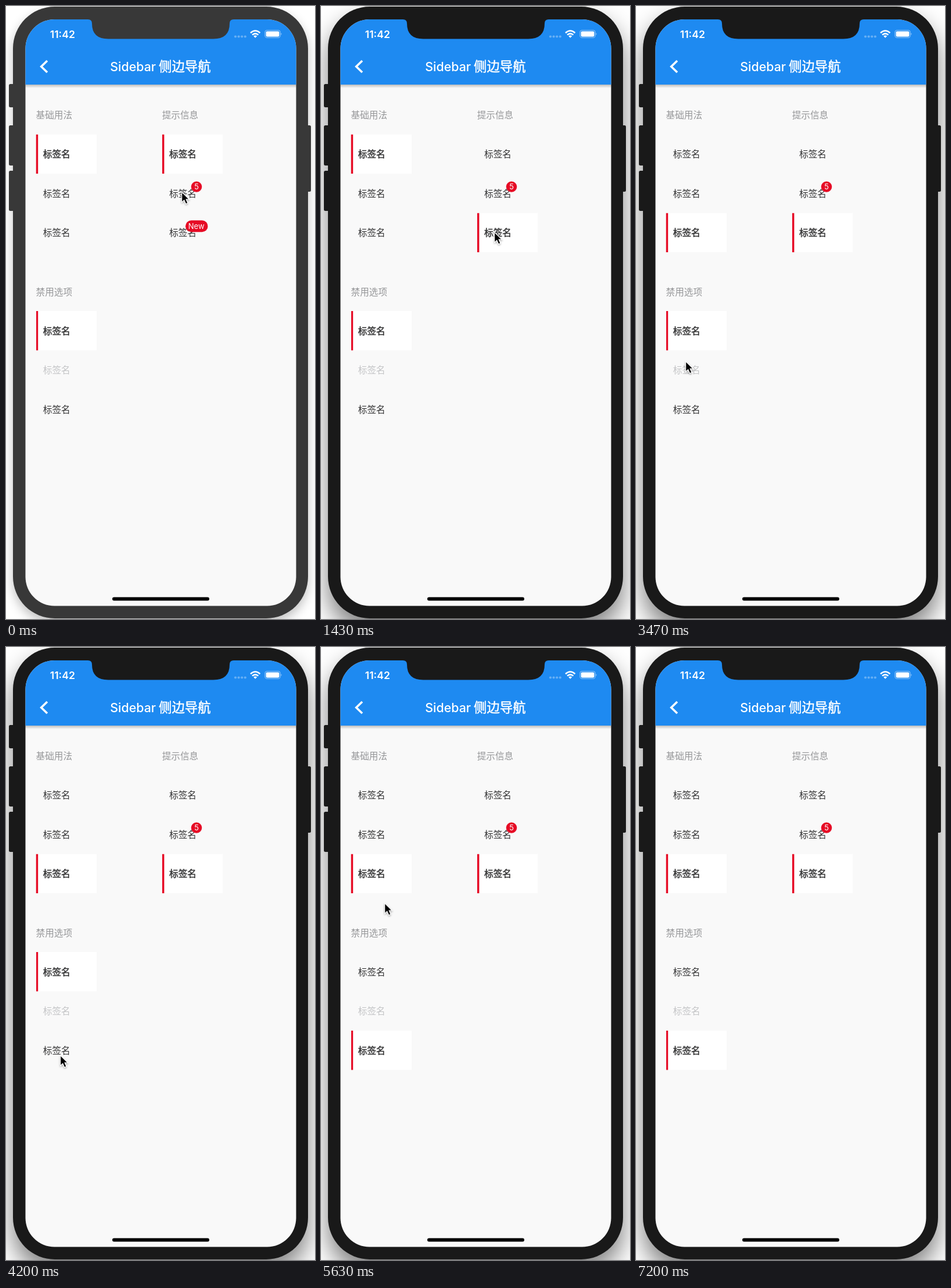
These frames come from a looping animation (532 px wide and 1053 px high, 7230 ms). An HTML page:

```html
<!DOCTYPE html>
<html lang="zh-CN">
<head>
<meta charset="utf-8">
<title>Sidebar</title>
<style>
html, body { margin: 0; width: 100%; height: 100%; overflow: hidden; background: #fff; }
.stage { position: relative; width: 532px; height: 1053px; overflow: hidden; }
.phone {
  position: absolute; left: 12px; top: 1px; width: 508px; height: 1051px;
  border-radius: 72px; background: currentColor;
}
svg { position: absolute; left: 0; top: 0; }
text { font-family: Inter, "Noto Sans CJK SC", "Noto Sans CJK", sans-serif; }
.label { font-size: 15.65px; fill: #959698; }
.item { font-size: 15.65px; fill: #323233; }
.off { fill: #c3c4c6; }
.bold { stroke: #323233; stroke-width: .45px; }
.badge { font-size: 13px; fill: #fff; text-anchor: middle; }
.red { fill: #e60b25; }

.stage, .phone, .pick, .cursor { animation: 7230ms infinite; }
.stage { animation-name: focus; animation-timing-function: step-end; }
.phone { animation-name: shade; animation-timing-function: step-end; }
.pick { animation-timing-function: step-end; }
.basic { animation-name: basic; }
.info { animation-name: info; }
.disabled { animation-name: disabled; }
.cursor { animation-name: move; animation-timing-function: ease-in-out; }

@keyframes focus {
  0% { color: #383838; }
  4.15%, 100% { color: #191919; }
}
@keyframes shade {
  0% { box-shadow: 0 8px 18px rgba(0, 0, 0, .25); }
  4.15%, 100% { box-shadow: 0 22px 40px rgba(0, 0, 0, .5); }
}
@keyframes basic {
  0% { transform: none; }
  31.54% { transform: translateY(67.5px); }
  41.49%, 100% { transform: translateY(135px); }
}
@keyframes info {
  0% { transform: none; }
  5.53% { transform: translateY(67.5px); }
  15.91%, 100% { transform: translateY(135px); }
}
@keyframes disabled {
  0% { transform: none; }
  60.17%, 100% { transform: translateY(135px); }
}
@keyframes move {
  0%, 9.68% { transform: translate(302px, 319px); }
  14.94%, 20.75% { transform: translate(298px, 388px); }
  29.74%, 32.23% { transform: translate(103px, 318px); }
  34.99% { transform: translate(105px, 356px); }
  38.04%, 42.6% { transform: translate(102px, 386px); }
  47.99% { transform: translate(85px, 610px); }
  49.5%, 52.56% { transform: translate(84px, 616px); }
  56.02%, 61.69% { transform: translate(93px, 701px); }
  67.08% { transform: translate(84px, 618px); }
  72.61% { transform: translate(84px, 618px); animation-timing-function: ease-in; }
  77.87% { transform: translate(109px, 440px); animation-timing-function: linear; }
  81.6% { transform: translate(125px, 310px); animation-timing-function: linear; }
  85.06% { transform: translate(150px, 215px); opacity: 1; animation-timing-function: step-start; }
  85.07%, 100% { transform: translate(150px, 215px); opacity: 0; }
}
</style>
</head>
<body>
<div class="stage">
  <div class="phone"></div>
  <svg width="532" height="1053" viewBox="0 0 532 1053">
    <defs>
      <clipPath id="screen"><rect x="33.5" y="23" width="466" height="1007.5" rx="50"/></clipPath>
      <linearGradient id="fall" x2="0" y2="1">
        <stop stop-color="#000" stop-opacity=".24"/>
        <stop offset="1" stop-color="#000" stop-opacity="0"/>
      </linearGradient>
      <filter id="soft" x="-50%" y="-50%" width="200%" height="200%">
        <feDropShadow dx="0" dy="1.5" stdDeviation="1.5" flood-opacity=".35"/>
      </filter>
      <g id="on">
        <rect width="104.5" height="67.5" fill="#fff"/>
        <rect class="red" width="3.7" height="67.5"/>
        <text class="item bold" x="12.3" y="39.8">标签名</text>
      </g>
      <g id="rest">
        <text class="item" x="12.3" y="39.8">标签名</text>
        <text class="item" x="12.3" y="174.8">标签名</text>
      </g>
      <text id="second" x="12.3" y="107.3">标签名</text>
    </defs>

    <g fill="currentColor">
      <rect x="5" y="134" width="9" height="40" rx="2.5"/>
      <rect x="5" y="205" width="9" height="69" rx="2.5"/>
      <rect x="5" y="283" width="9" height="69" rx="2.5"/>
      <rect x="517" y="205" width="8" height="114" rx="2.5"/>
    </g>

    <g clip-path="url(#screen)">
      <rect x="33" y="22" width="468" height="1010" fill="#f9f9f9"/>
      <rect x="33" y="135" width="468" height="6" fill="url(#fall)"/>
      <rect x="33" y="22" width="468" height="113" fill="#1e8af1"/>
    </g>
    <path d="M141 22H392V23Q385 23 385 30Q385 56.5 357 56.5H176Q148 56.5 148 30Q148 23 141 23Z" fill="currentColor"/>

    <g fill="#fff">
      <text x="97.3" y="54.5" font-size="17.6" font-weight="600" text-anchor="middle">11:42</text>
      <g opacity=".32">
        <circle cx="395" cy="52.5" r="2.1"/><circle cx="400.6" cy="52.5" r="2.1"/>
        <circle cx="406.2" cy="52.5" r="2.1"/><circle cx="411.8" cy="52.5" r="2.1"/>
      </g>
      <g fill="none" stroke="#fff" stroke-width="2.6">
        <path d="M421 46.2Q429.2 38.8 437.4 46.2"/>
        <path d="M424 49.6Q429.2 45 434.4 49.6"/>
      </g>
      <path d="M426.2 51.7Q429.2 49.4 432.2 51.7L429.2 54.8Z"/>
      <rect x="445.9" y="41.7" width="26.2" height="12.8" rx="3.6" fill="none" stroke="#fff" stroke-opacity=".5" stroke-width="1.1"/>
      <rect x="447.6" y="43.4" width="22.8" height="9.4" rx="2.2"/>
      <path d="M473.4 46Q475.6 48 473.4 50.2Z" opacity=".55"/>
      <path d="M71 94L60.7 104L71 114" fill="none" stroke="#fff" stroke-width="3.6"/>
      <text x="179.3" y="111.6" font-size="21.4" font-weight="500">Sidebar</text>
      <text x="263" y="112" font-size="22.4" stroke="#fff" stroke-width=".5">侧边导航</text>
    </g>

    <text class="label" x="51.5" y="193">基础用法</text>
    <text class="label" x="268.7" y="193">提示信息</text>
    <text class="label" x="51.5" y="496.5">禁用选项</text>

    <g transform="translate(51.5 220.5)">
      <use href="#rest"/><use href="#second" class="item"/>
      <g class="pick basic"><use href="#on"/></g>
    </g>
    <g transform="translate(268.7 220.5)">
      <use href="#rest"/><use href="#second" class="item"/>
      <circle class="red" cx="59.3" cy="90" r="9.3"/>
      <text class="badge" x="59.3" y="94.7">5</text>
      <rect class="red" x="40.3" y="147.7" width="38.6" height="20" rx="10"/>
      <text class="badge" x="59" y="162.3">New</text>
      <g class="pick info"><use href="#on"/></g>
    </g>
    <g transform="translate(51.5 524)">
      <use href="#rest"/><use href="#second" class="item off"/>
      <g class="pick disabled"><use href="#on"/></g>
    </g>

    <rect x="183" y="1015.5" width="167" height="6" rx="3"/>

    <g class="cursor">
      <path d="M.6 .6V18.2L4.7 14.4L7.6 21L11 19.5L8.2 13.2H13.6Z" stroke="#fff" stroke-width="1.2" filter="url(#soft)"/>
    </g>
  </svg>
</div>
</body>
</html>
```
